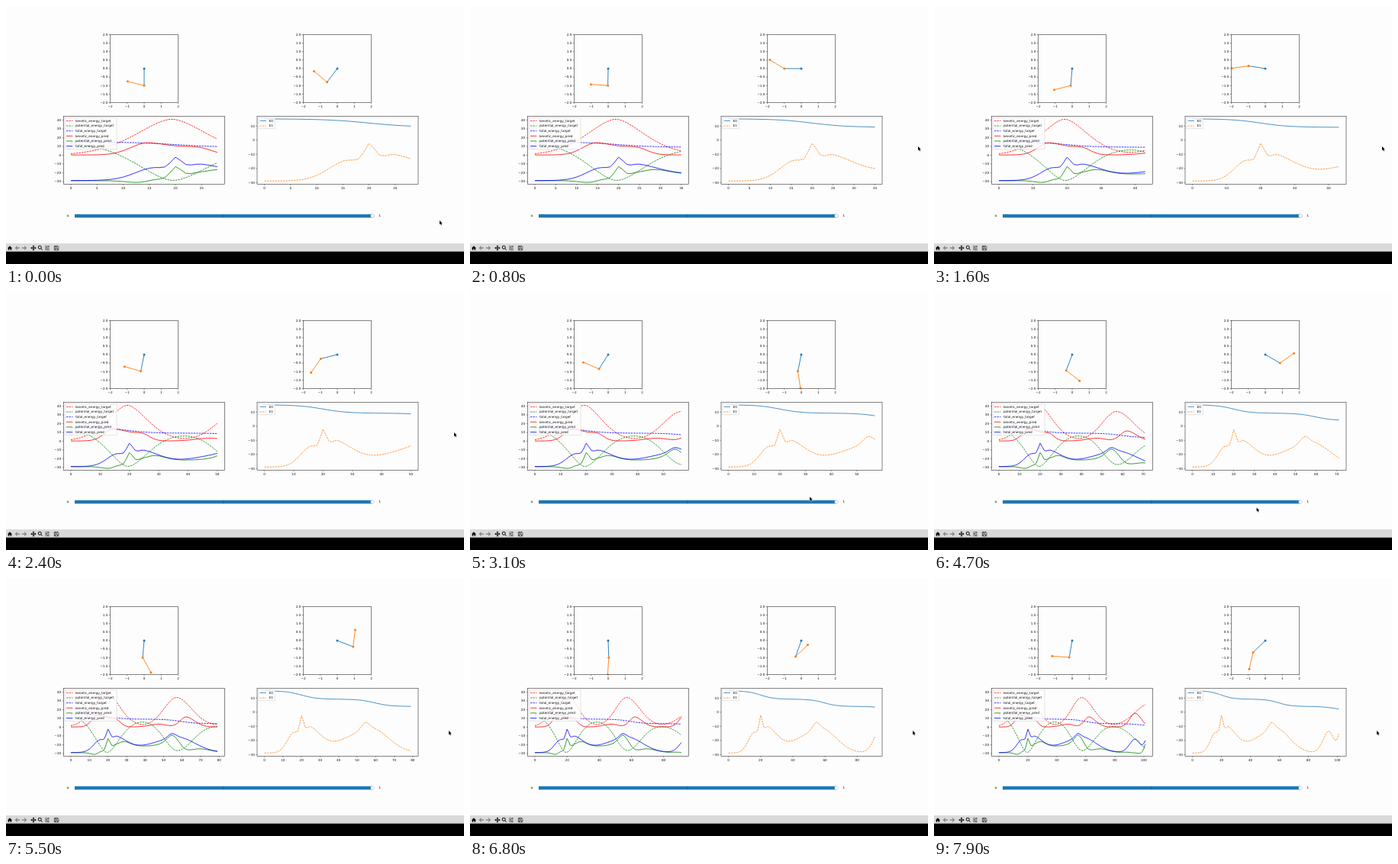
An HTML page with a canvas for the animation above (8000 ms loop, 600 by 338 pixels).

```html
<!DOCTYPE html>
<html lang="en">
<head>
<meta charset="utf-8">
<title>Double pendulum energies</title>
<style>
html, body { margin: 0; width: 100%; height: 100%; overflow: hidden; background: #fff; }
canvas { display: block; }
</style>
</head>
<body>
<canvas id="stage" width="600" height="338"></canvas>
<script>
const g = document.getElementById('stage').getContext('2d');
const BLUE = '#1f77b4', ORANGE = '#ff7f0e', DASH = [2.4, 1.1];
const LOOP = 8000, FRAME = 100;

// A hill with its own width on each side, and a soft step from 0 to 1
const bump = (x, centre, height, left, right, power = 1.9) =>
  height * Math.exp(-Math.pow(Math.abs(x - centre) / (x < centre ? left : right), power));
const step = (x, centre, width) => 1 / (1 + Math.exp((centre - x) / width));

// Energies by time step
const totalT = n => 15.1 - 5.9 * step(n, 20, 4.2) - 5.1 * step(n, 59.5, 4.2) - 3.5 * step(n, 100, 5);
const kineticT = n => bump(n, 19.3, 41.3, 9.8, 9.9, 1.7) + bump(n, 57, 34, 10, 12) + bump(n, 104, 27, 15, 15);
const potentialT = n => totalT(n) - kineticT(n);
const totalP = n => -28.9
  + bump(n, 16, 14.5, 5.2, 14) + bump(n, 20, 12, 1.2, 1.5) + bump(n, 25, 8, 3.3, 8)
  + bump(n, 58, 17.3, 20, 13) + bump(n, 54.5, 5, 3, 3)
  + bump(n, 94, 15.5, 5.5, 5) + bump(n, 103, 18, 3, 3);
const kineticP = n => .3
  + bump(n, 14.5, 13.8, 4.4, 7) + bump(n, 24.5, 7, 5, 3.5) + bump(n, 47.5, 3.2, 7, 6)
  + bump(n, 62, 11.5, 4.4, 6.7) + bump(n, 94, 15.7, 5.2, 5.8);
const potentialP = n => totalP(n) - kineticP(n);

// Smooth curve through a few [x, y] points that never overshoots them
function curve(...p) {
  const slope = p.slice(1).map((b, i) => (b[1] - p[i][1]) / (b[0] - p[i][0]));
  const tangent = p.map((_, i) => {
    const a = slope[i - 1] ?? slope[i], b = slope[i] ?? a;
    return a * b <= 0 ? 0 : 2 * a * b / (a + b);
  });
  return x => {
    const i = Math.max(0, p.findIndex(q => q[0] >= x) - 1);
    const h = p[i + 1][0] - p[i][0], u = (x - p[i][0]) / h, v = 1 - u;
    return v * v * (1 + 2 * u) * p[i][1] + u * u * (3 - 2 * u) * p[i + 1][1]
      + h * u * v * (v * tangent[i] - u * tangent[i + 1]);
  };
}

// Rod angles in degrees from straight down: inner and outer rod
const predicted = [
  curve([28, 0], [35, -1], [50, -11.5], [61, -40], [63, -38], [79, -5], [91, 2], [101, -10]),
  curve([28, -104], [35, -94], [41, -73], [50, -106], [54, -145], [63, 2.5], [71, 52], [79, 29], [91, -3.5], [101, -94])
];
const target = [
  curve([28, -37], [35, -90], [40, -102], [50, -76], [63, 38.5], [79, 69], [91, -19.5], [97, -52], [101, -46]),
  curve([28, -130], [35, -121], [50, -35], [63, 49], [79, 173], [91, 134], [101, -13])
];

function line(points, color, width = .75, dash = []) {
  g.beginPath();
  points.forEach(([x, y]) => g.lineTo(x, y));
  g.strokeStyle = color;
  g.lineWidth = width;
  g.setLineDash(dash);
  g.stroke();
  g.setLineDash([]);
}

function dot(x, y, r, color) {
  g.beginPath();
  g.arc(x, y, r, 0, 7);
  g.fillStyle = color;
  g.fill();
}

function rect(x, y, w, h, color) {
  g.fillStyle = color;
  g.fillRect(x, y, w, h);
}

function frame(x, y, w, h, color = '#333') {
  g.strokeStyle = color;
  g.lineWidth = .6;
  g.strokeRect(x, y, w, h);
}

function label(text, x, y, align = 'center') {
  g.font = '4.2px "DejaVu Sans", sans-serif';
  g.textAlign = align;
  g.textBaseline = 'middle';
  g.fillStyle = '#111';
  g.fillText(String(text).replace('-', '\u2212'), x, y + .2);
}

function xTick(value, x, y) {
  line([[x, y], [x, y + 1.6]], '#333', .5);
  label(value, x, y + 5.2);
}

function yTick(value, x, y) {
  line([[x, y], [x - 1.6, y]], '#333', .5);
  label(value, x - 3.2, y, 'right');
}

function clipped(x, y, w, h, draw) {
  g.save();
  g.beginPath();
  g.rect(x, y, w, h);
  g.clip();
  draw();
  g.restore();
}

function pendulum(left, angles, n) {
  const top = 37.5, size = 89, unit = size / 4;
  const x0 = left + size / 2, y0 = top + size / 2;
  const [a, b] = angles.map(f => f(n) * Math.PI / 180);
  const x1 = x0 + unit * Math.sin(a), y1 = y0 + unit * Math.cos(a);
  const x2 = x1 + unit * Math.sin(b), y2 = y1 + unit * Math.cos(b);
  for (let v = -2; v <= 2; v++) xTick(v, x0 + v * unit, top + size);
  for (let v = -2; v <= 2; v += .5) yTick(v.toFixed(1), left, y0 - v * unit);
  clipped(left, top, size, size, () => {
    line([[x0, y0], [x1, y1]], BLUE, .9);
    dot(x0, y0, 1.5, BLUE);
    line([[x1, y1], [x2, y2]], ORANGE, .9);
    dot(x1, y1, 1.5, ORANGE);
    dot(x2, y2, 1.5, ORANGE);
  });
  frame(left, top, size, size);
}

function legend(x, y, w, h, series) {
  rect(x, y, w, h, 'rgba(255,255,255,.8)');
  frame(x, y, w, h, '#d4d4d4');
  series.forEach(([name, , color, dash], i) => {
    const rowY = y + 4.1 + i * 6.63;
    line([[x + 1.7, rowY], [x + 10, rowY]], color, .8, dash);
    label(name, x + 13.6, rowY, 'left');
  });
}

function plot(left, zero, scale, maxTick, legendWidth, series, n) {
  const top = 144.5, w = 211, h = 89;
  const px = k => left + w * (k / n + .05) / 1.1;
  const gap = n * 1.1 > 90 ? 20 : n * 1.1 > 45 ? 10 : 5;
  for (let k = 0; k <= n * 1.05; k += gap) xTick(k, px(k), top + h);
  for (let v = -30; v <= maxTick; v += 10) yTick(v, left, zero - v * scale);
  clipped(left, top, w, h, () => series.forEach(([, f, color, dash]) => {
    const points = Array.from({ length: n + 1 }, (_, k) => [px(k), zero - f(k) * scale]);
    line(points, color, .8, dash);
  }));
  frame(left, top, w, h);
  legend(left + 1.9, top + 1.8, legendWidth, 1.2 + 6.63 * series.length, series);
}

const energies = [
  ['kenetic_energy_target', kineticT, '#f00', DASH],
  ['potential_energy_target', potentialT, '#008000', DASH],
  ['total_energy_target', totalT, '#00f', DASH],
  ['kenetic_energy_pred', kineticP, '#f00'],
  ['potential_energy_pred', potentialP, '#008000'],
  ['total_energy_pred', totalP, '#00f']
];
const totals = [['E0', totalT, BLUE], ['E1', totalP, ORANGE, DASH]];

function slider() {
  label('α', 81, 275);
  rect(90, 272.8, 390, 4.5, BLUE);
  line([[284.6, 272.8], [284.6, 277.3]], '#7a3a60', .6);
  dot(480, 275, 2.5, '#bbb');
  dot(480, 275, 2.1, '#fff');
  label(1, 489.5, 275);
}

function icon(path, color, width) {
  g.strokeStyle = color;
  g.lineWidth = width;
  g.stroke(new Path2D(path));
}

function toolbar() {
  rect(0, 311, 600, 11, '#d9d9d9');
  rect(0, 321.7, 600, 17, '#000');
  g.fill(new Path2D('M2 317.2 5 314.2 8 317.2H7.2V319.8H5.7V318H4.3V319.8H2.8V317.2Z'));
  icon('M18 317H12.5M15 314.6 12.5 317 15 319.4', '#555', .9);
  icon('M21 317H26.5M24 314.6 26.5 317 24 319.4', '#555', .9);
  icon('M33 317H39M36 314V320', '#000', 1);
  g.fill(new Path2D('M36 313.4l1.4 1.7h-2.8zM36 320.6l1.4-1.7h-2.8zM32.4 317l1.7 1.4v-2.8zM39.6 317l-1.7 1.4v-2.8z'));
  icon('M46.3 316.2a2 2 0 1 1-4 0a2 2 0 1 1 4 0M45.8 317.7 47.6 319.6', '#000', 1);
  icon('M51.2 314.8h5.6M51.2 317h5.6M51.2 319.2h5.6M55.3 314v1.6M52.7 316.2v1.6M55 318.4v1.6', '#222', .7);
  icon('M63.3 314.4h4.6l.9.9v4.4h-5.5zM64.5 314.4v1.6h2.6v-1.6M64.5 319.7v-2.1h3v2.1', '#222', .7);
}

// Share of a smooth move between two times
function glide(t, from, to) {
  const u = Math.min(1, Math.max(0, (t - from) / (to - from)));
  return u * u * (3 - 2 * u);
}

function pointer(t) {
  const up = glide(t, 100, 500), away = glide(t, 2600, 3300), back = glide(t, 4600, 5200);
  g.save();
  g.translate(568 + 19 * up - 177 * away + 170 * back, 281 - 97 * up + 105 * away - 89 * back);
  const arrow = new Path2D('M0 0V5.2L1.2 4.2 2.1 6.2 3 5.8 2.1 3.9 3.7 3.8Z');
  g.strokeStyle = '#fff';
  g.lineWidth = .8;
  g.stroke(arrow);
  g.fillStyle = '#000';
  g.fill(arrow);
  g.restore();
}

function draw(now) {
  const tick = Math.floor((now % LOOP) / FRAME);
  const n = 28 + Math.round(tick * .925);
  rect(0, 0, 600, 338, '#fefdfe');
  pendulum(136.5, predicted, n);
  pendulum(389.5, target, n);
  plot(75.4, 195.5, 1.146, 40, 67.7, energies, n);
  plot(329, 175.8, 1.85, 10, 21.3, totals, n);
  slider();
  toolbar();
  pointer(tick * FRAME);
}

const start = performance.now();
function loop() {
  draw(performance.now() - start);
  requestAnimationFrame(loop);
}
loop();
</script>
</body>
</html>
```
